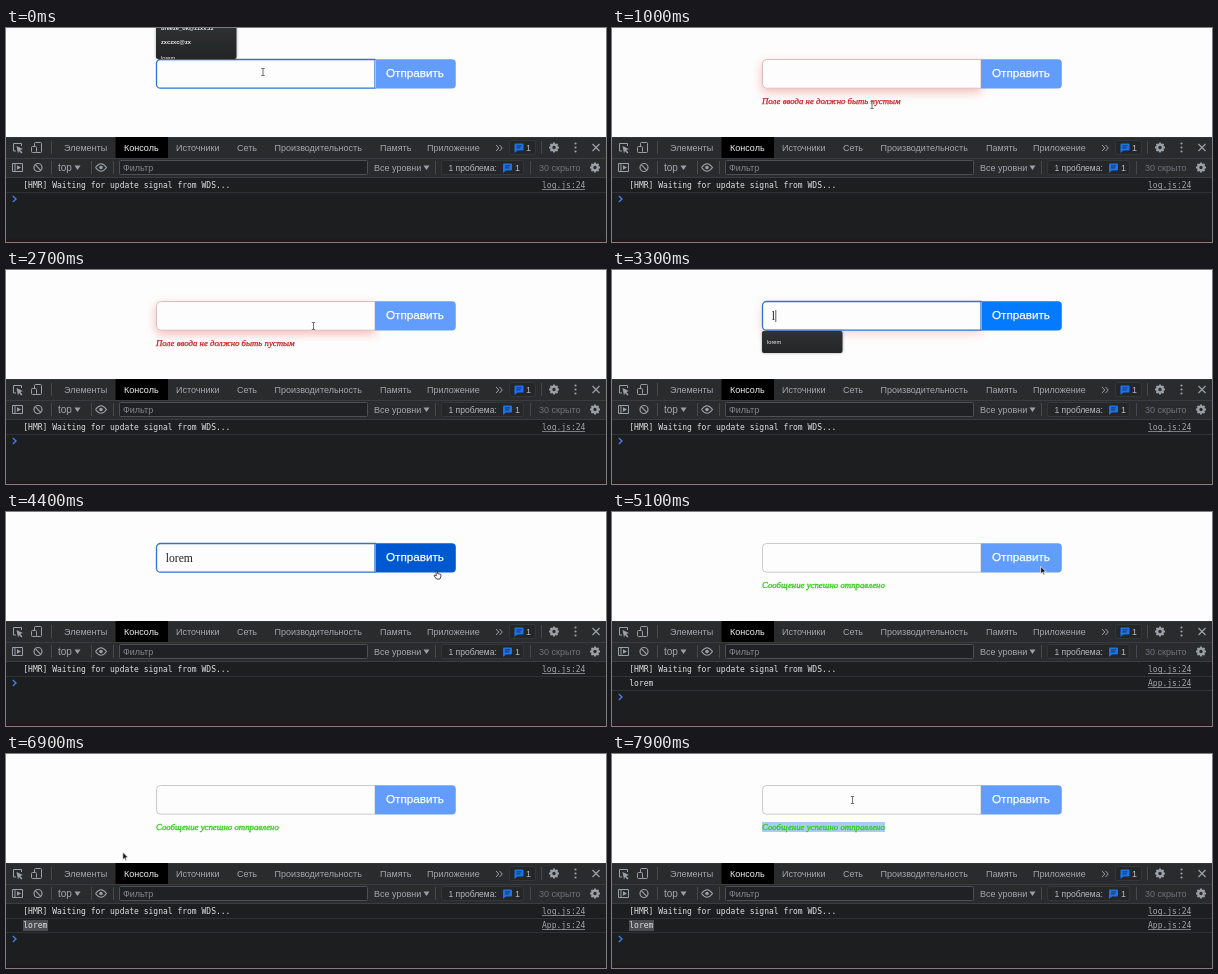
Recreate the animation shown at these times as an HTML page with a canvas. Size 600 by 214 pixels, loop 8000 ms.

```html
<!DOCTYPE html>
<html lang="ru">
<head>
<meta charset="utf-8">
<style>
html, body { margin: 0; width: 100%; height: 100%; overflow: hidden; background: #fdfdfd; }
canvas { display: block; width: 600px; height: 214px; }
</style>
</head>
<body>
<canvas id="stage"></canvas>
<script>
const W = 600, H = 214, LOOP = 8000, STEP = 100;
const canvas = document.getElementById('stage');
const ratio = window.devicePixelRatio || 1;
canvas.width = W * ratio;
canvas.height = H * ratio;
const ctx = canvas.getContext('2d');
ctx.scale(ratio, ratio);

const SANS = '"Liberation Sans", sans-serif';
const SERIF = '"Liberation Serif", serif';
const MONO = '"DejaVu Sans Mono", monospace';
const ICON = '#9aa0a6', LABEL = '#a4a8ad', BLUE = '#1a73e8';
const DISABLED = [98, 157, 253], ENABLED = [4, 122, 255], HOVER = [0, 88, 209];

// Pointer path: time, x, y
const pointerPath = [
  [0, 257, 44], [100, 257, 45], [500, 260, 77], [1400, 260, 77],
  [1800, 408, 52], [2200, 408, 52], [2700, 307.5, 56], [3000, 186, 47],
  [3900, 186, 47], [4400, 431, 59], [5400, 428, 53], [5900, 15.5, 168],
  [6300, 19, 170], [7200, 151, 73], [7400, 275, 73], [7500, 275, 73], [7900, 240.5, 46]
];
const glowTrack = [[0, 0], [500, 0], [900, 1], [3100, 1], [3300, .6], [3600, 0]];
const enableTrack = [[0, 0], [3100, 0], [3300, 1], [4500, 1], [4700, 0]];
const hoverTrack = [[0, 0], [4200, 0], [4400, 1], [4500, 1], [4700, 0]];
const selectTrack = [[0, 0], [7200, 0], [7400, 1]];

function sample(track, t, ease = u => u) {
  const next = track.findIndex(k => k[0] > t);
  if (next < 0) return track[track.length - 1].slice(1);
  const a = track[next - 1], b = track[next];
  const u = ease((t - a[0]) / (b[0] - a[0]));
  return a.slice(1).map((v, i) => v + (b[i + 1] - v) * u);
}

const smooth = u => u * u * (3 - 2 * u);
const between = (t, a, b) => t >= a && t < b;
const blend = (a, b, u) => a.map((v, i) => v + (b[i] - v) * u);
const rgb = c => `rgb(${c.map(Math.round).join(',')})`;

function rect(x, y, w, h, color) {
  ctx.fillStyle = color;
  ctx.fillRect(x, y, w, h);
}

function box(x, y, w, h, r, fill, stroke, width = 1) {
  ctx.beginPath();
  ctx.roundRect(x, y, w, h, r);
  if (fill) { ctx.fillStyle = fill; ctx.fill(); }
  if (stroke) { ctx.strokeStyle = stroke; ctx.lineWidth = width; ctx.stroke(); }
}

// `heft` thickens the glyphs slightly
function text(str, x, y, font, color, heft = 0) {
  ctx.font = font;
  ctx.fillStyle = color;
  ctx.fillText(str, x, y);
  if (heft) {
    ctx.strokeStyle = color;
    ctx.lineWidth = heft;
    ctx.strokeText(str, x, y);
  }
}

function line(points, color = ICON, width = 1) {
  ctx.beginPath();
  points.forEach(([x, y], i) => i ? ctx.lineTo(x, y) : ctx.moveTo(x, y));
  ctx.strokeStyle = color;
  ctx.lineWidth = width;
  ctx.stroke();
}

function shape(points, fill) {
  ctx.beginPath();
  points.forEach(([x, y]) => ctx.lineTo(x, y));
  ctx.closePath();
  ctx.fillStyle = fill;
  ctx.fill();
}

function ring(x, y, r, color = ICON, width = 1) {
  ctx.beginPath();
  ctx.arc(x, y, r, 0, Math.PI * 2);
  ctx.strokeStyle = color;
  ctx.lineWidth = width;
  ctx.stroke();
}

function dot(x, y, r, color = ICON) {
  ctx.beginPath();
  ctx.arc(x, y, r, 0, Math.PI * 2);
  ctx.fillStyle = color;
  ctx.fill();
}

function gear(x, y) {
  for (let i = 0; i < 8; i++) {
    const a = i * Math.PI / 4, c = Math.cos(a), s = Math.sin(a);
    line([[x + c * 3, y + s * 3], [x + c * 5, y + s * 5]], ICON, 1.9);
  }
  ring(x, y, 2.8, ICON, 2.2);
}

function bubble(x, y) {
  box(x, y, 9, 7, 1, BLUE);
  shape([[x, y + 5], [x + 4, y + 6], [x, y + 9.5]], BLUE);
  rect(x + 2, y + 2, 5, .8, '#202124');
  rect(x + 2, y + 4, 4, .8, '#202124');
}

function caretDown(x, y) {
  shape([[x - 3, y - 2], [x + 3, y - 2], [x, y + 2.5]], ICON);
}

function drawTabs() {
  rect(0, 109, W, 21, '#292b2d');
  rect(0, 109, W, 1, '#343639');
  rect(109.5, 109, 52.5, 21, '#000');

  line([[10, 123], [7.5, 123], [7.5, 115.5], [15.5, 115.5], [15.5, 118]]);
  shape([[10.5, 118], [17, 121], [14.2, 122], [16.5, 124.5], [15.3, 125.5], [13, 123], [12, 125.5]], ICON);
  box(28.5, 114.5, 7, 10, 1, null, ICON);
  box(25.5, 118.5, 5, 6, 1, '#292b2d', ICON);
  rect(45, 113, 1, 13, '#46494d');

  const tabs = [['Элементы', 58], ['Консоль', 118], ['Источники', 170], ['Сеть', 231],
    ['Производительность', 268.5], ['Память', 374], ['Приложение', 421]];
  for (const [name, x] of tabs) text(name, x, 123, `9px ${SANS}`, x === 118 ? '#f1f1f1' : LABEL);

  for (const x of [490, 493.5]) line([[x, 117], [x + 2.8, 120], [x, 123]]);
  box(503.5, 112.5, 26, 14, 2, '#242628', '#34373a');
  bubble(508.5, 115.5);
  text('1', 520, 123, `9px ${SANS}`, '#b8bcc0');
  rect(535, 113, 1, 13, '#46494d');
  gear(548, 119.5);
  for (const y of [115.5, 119.5, 123.5]) dot(569.5, y, 1.1);
  line([[586.5, 116], [593.5, 123]], ICON, 1.2);
  line([[593.5, 116], [586.5, 123]], ICON, 1.2);
}

function drawToolbar() {
  rect(0, 130, W, 19, '#292b2d');
  rect(0, 130, W, 1, '#3a3d40');
  rect(0, 149, W, 1, '#3a3d40');

  box(6.5, 135.5, 10, 8, 0, null, ICON);
  rect(8.5, 135, 1, 9, ICON);
  shape([[11, 137.3], [15, 139.5], [11, 141.7]], ICON);
  ring(32, 139.5, 4, ICON, 1.2);
  line([[29.3, 136.7], [34.7, 142.3]], ICON, 1.2);
  rect(45, 133, 1, 13, '#46494d');
  text('top', 52, 142.5, `10px ${SANS}`, LABEL);
  caretDown(71.5, 139.5);
  rect(85, 133, 1, 13, '#46494d');

  ctx.beginPath();
  ctx.moveTo(89.5, 139.5);
  ctx.quadraticCurveTo(95, 132, 100.5, 139.5);
  ctx.quadraticCurveTo(95, 147, 89.5, 139.5);
  ctx.strokeStyle = ICON;
  ctx.lineWidth = 1.2;
  ctx.stroke();
  dot(95, 139.5, 1.8);
  rect(107, 133, 1, 13, '#46494d');

  box(113.5, 132.5, 248, 14, 1, '#202124', '#4c4f53');
  text('Фильтр', 117, 142.5, `9px ${SANS}`, '#85898e');
  text('Все уровни', 368, 142.5, `9px ${SANS}`, LABEL);
  caretDown(420.5, 139.5);
  rect(429, 133, 1, 13, '#46494d');
  box(435.5, 132.5, 82, 14, 2, '#242628', '#34373a');
  text('1 проблема:', 442.5, 142.5, `8.5px ${SANS}`, '#b8bcc0');
  bubble(497, 135.5);
  text('1', 509, 142.5, `9px ${SANS}`, '#b8bcc0');
  rect(524, 133, 1, 13, '#46494d');
  text('30 скрыто', 533, 142.5, `9px ${SANS}`, '#6f7378');
  gear(589, 139.5);
}

function logRow(str, link, y) {
  text(str, 17.3, y, `8px ${MONO}`, '#dfe1e3');
  text(link, 536, y, `8px ${MONO}`, '#a2a5a9');
  rect(536, y + 1.2, 43, .7, '#a2a5a9');
}

function drawConsole(t) {
  const sent = t >= 4700;
  rect(0, 150, W, 64, '#1c1e20');
  logRow('[HMR] Waiting for update signal from WDS...', 'log.js:24', 159.8);
  rect(0, 164, W, 1, '#2f3235');
  if (sent) {
    if (t >= 6200) rect(17, 166, 25, 11, '#4b4d50');
    logRow('lorem', 'App.js:24', 174);
    rect(0, 178, W, 1, '#2f3235');
  }
  const y = sent ? 185 : 171;
  line([[6.8, y - 3], [10, y], [6.8, y + 3]], '#3f7fe8', 1.4);
  rect(0, 211.5, W, 2.5, '#25141a');
}

function dropdown(y, h, rows) {
  const fill = ctx.createLinearGradient(0, y, 0, y + h);
  fill.addColorStop(0, '#303334');
  fill.addColorStop(1, '#222425');
  ctx.save();
  ctx.shadowColor = 'rgba(0,0,0,.35)';
  ctx.shadowBlur = 3 * ratio;
  box(150, y, 80.5, h, 2, fill);
  ctx.restore();
  ctx.save();
  ctx.beginPath();
  ctx.rect(150, y, 80, h);
  ctx.clip();
  for (const [str, base, weight] of rows) text(str, 155, base, `${weight} 5.7px ${SANS}`, '#eceeee');
  ctx.restore();
}

function drawForm(t) {
  const focus = t < 500 || between(t, 3000, 4600);
  const [glow] = sample(glowTrack, t);
  const [enabled] = sample(enableTrack, t);
  const [hover] = sample(hoverTrack, t);
  const [selected] = sample(selectTrack, t);
  const typed = 'lorem'.slice(0, Math.max(0, Math.floor((t - 3200) / STEP)));

  ctx.save();
  if (glow > 0) {
    ctx.shadowColor = `rgba(235,60,50,${.36 * glow})`;
    ctx.shadowBlur = 10 * ratio;
    ctx.shadowOffsetY = 3.5 * ratio;
  }
  const corners = [4, 0, 0, 4];
  box(150, 31.2, 219, 29.3, corners, '#fdfdfd');
  ctx.restore();
  const idle = rgb(blend([200, 203, 206], [214, 190, 190], glow));
  box(150.5, 31.5, 218.5, 28.7, corners, null, focus ? '#2f74cf' : idle, focus ? 1.3 : 1);

  const face = blend(blend(DISABLED, ENABLED, enabled), HOVER, hover);
  box(369, 31.2, 80.8, 29.3, [0, 4, 4, 0], rgb(face));
  if (focus) rect(369.3, 32, .7, 28, 'rgba(255,255,255,.6)');
  text('Отправить', 380, 49.2, `11.7px ${SANS}`, '#fff', .25);

  if (between(t, 3200, 4600)) {
    text(typed, 159.7, 49.6, `11.67px ${SERIF}`, '#222');
    if (t < 3800) {
      const end = 160.2 + ctx.measureText(typed).width;
      rect(end, 40, .8, 12, '#333');
    }
  }

  const note = `italic 8.8px ${SERIF}`;
  if (between(t, 600, 3200)) text('Поле ввода не должно быть пустым', 150, 76, note, '#c91c1c', .25);
  if (t >= 4700) {
    rect(150, 68, 123 * selected, 10, '#a8cdf7');
    text('Сообщение успешно отправлено', 150, 76, note, '#37cf1c', .35);
  }

  if (t < 400 || between(t, 3000, 3200)) {
    dropdown(-6, 37, [['breeze_ok@zzxx.zz', 1.5, 'bold'], ['zxczxc@zx', 16, 'bold'], ['lorem', 31.5, 'normal']]);
  }
  if (between(t, 3200, 3700)) dropdown(61, 22, [['lorem', 74, 'normal']]);
}

function beam(x, y) {
  const parts = [[[x, y - 3], [x, y + 3]], [[x - 1.7, y - 3.5], [x + 1.7, y - 3.5]], [[x - 1.7, y + 3.5], [x + 1.7, y + 3.5]]];
  for (const p of parts) line(p, 'rgba(255,255,255,.5)', 1.8);
  for (const p of parts) line(p, '#444', .75);
}

function outlined(x, y, points, fill, edge) {
  const path = points.map(([px, py]) => [x + px, y + py]);
  shape(path, fill);
  line([...path, path[0]], edge, .8);
}

function arrow(x, y) {
  outlined(x, y, [[0, 0], [0, 7.5], [1.8, 6], [3, 8.8], [4.2, 8.2], [3, 5.6], [5.4, 5.4]], '#111', '#f4f4f4');
}

function hand(x, y) {
  outlined(x, y, [[-.8, 0], [.4, 0], [.6, 2.6], [3.6, 3.2], [4, 5], [3, 8], [-.6, 8], [-3, 4.6], [-2, 4], [-.8, 5]],
    '#fff', '#222');
}

function drawPointer(t) {
  if (between(t, 3200, 4000)) return;
  const [x, y] = sample(pointerPath, t, smooth);
  const inRow = y >= 31 && y <= 61;
  const overInput = inRow && x >= 150 && x < 369;
  const overButton = inRow && x >= 369 && x < 450;
  const overNote = y > 64 && y < 80 && x >= 150 && x < 290;
  if (overInput || overNote) beam(x, y);
  else if (overButton && between(t, 4000, 4600)) hand(x, y);
  else arrow(x, y);
}

function draw(t) {
  rect(0, 0, W, H, '#fdfdfd');
  drawForm(t);
  drawTabs();
  drawToolbar();
  drawConsole(t);
  drawPointer(t);
}

const start = performance.now();
function tick() {
  const t = (performance.now() - start) % LOOP;
  draw(Math.floor(t / STEP) * STEP);
  requestAnimationFrame(tick);
}
tick();
</script>
</body>
</html>
```
